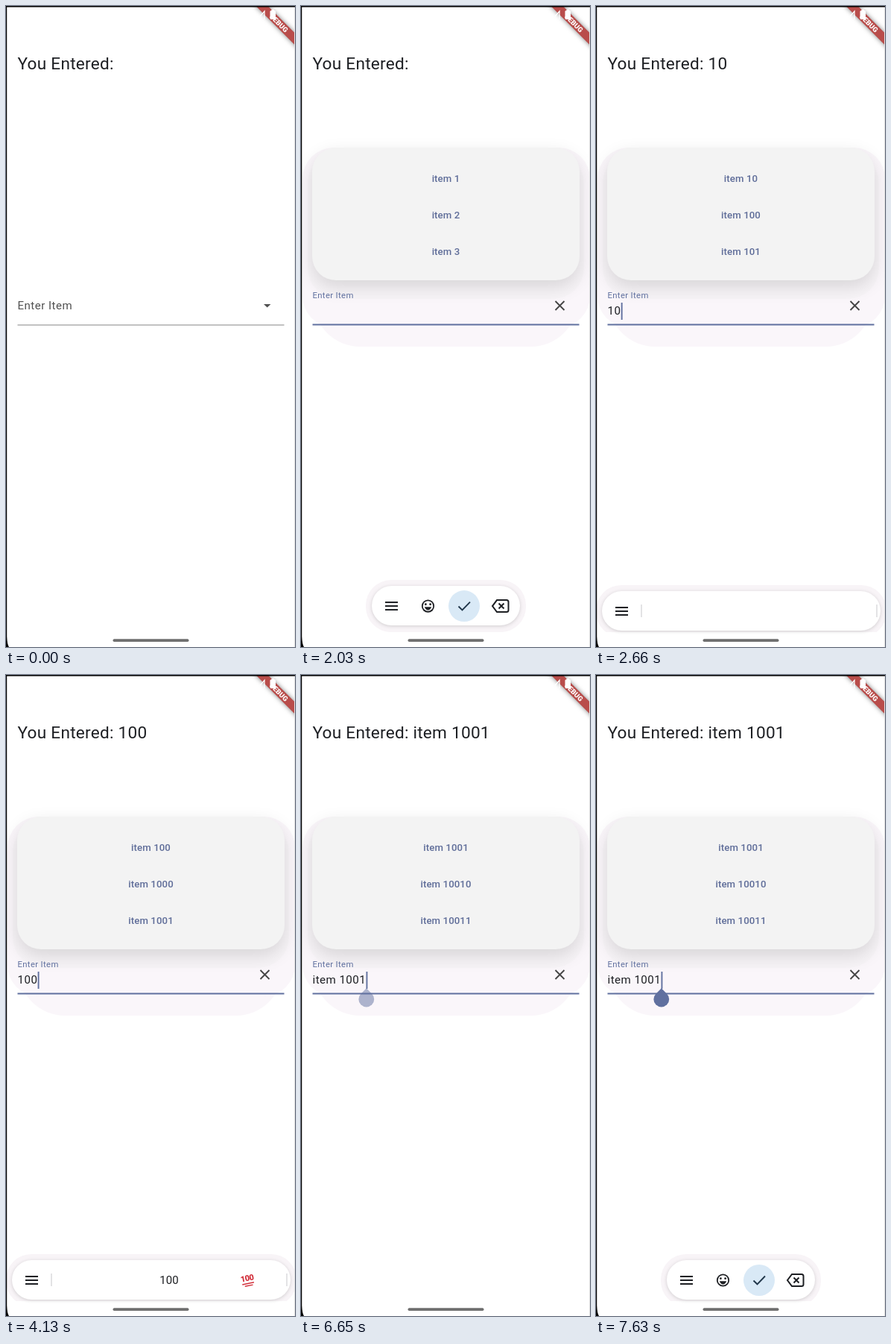
Animation of 388x860 px, one loop 8000 ms. Source, as an HTML page with a canvas:

```html
<!DOCTYPE html>
<html lang="en">
<head>
<meta charset="utf-8">
<style>
  html, body { margin: 0; width: 100%; height: 100%; overflow: hidden; background: #fff; }
  canvas { display: block; width: 388px; height: 860px; }
</style>
</head>
<body>
<canvas width="388" height="860"></canvas>
<script>
const ctx = document.querySelector('canvas').getContext('2d');
const LOOP = 8000, STEP = 70, LEFT = 15.5;
const BLUE = '#60709f', INK = '#1d1f23', GREY = '#505050';

// Search text over time; the matching items follow from it
const typing = [
  [0, '', ['1', '2', '3']],
  [2310, '1', ['1', '10', '11']],
  [2520, '10', ['10', '100', '101']],
  [3010, '100', ['100', '1000', '1001']],
  [5040, 'item 1001', ['1001', '10010', '10011']]
];
const caretOff = [[1960, 2310], [3570, 4130], [4690, 5040], [7070, 7630]];

const clamp = v => Math.min(1, Math.max(0, v));
const mix = (a, b, p) => a + (b - a) * p;

function rect(x, y, w, h, color) {
  ctx.fillStyle = color;
  ctx.fillRect(x, y, w, h);
}

function round(x, y, w, h, r, color) {
  ctx.fillStyle = color;
  ctx.beginPath();
  ctx.roundRect(x, y, w, h, r);
  ctx.fill();
}

function circle(x, y, r, color) {
  ctx.fillStyle = color;
  ctx.beginPath();
  ctx.arc(x, y, r, 0, 7);
  ctx.fill();
}

function stroke(path, color = INK, width = 2) {
  ctx.strokeStyle = color;
  ctx.lineWidth = width;
  ctx.stroke(new Path2D(path));
}

function text(str, x, y, size, color, spacing = 0, weight = 400, align = 'left') {
  ctx.font = `${weight} ${size}px Roboto, sans-serif`;
  ctx.letterSpacing = spacing + 'px';
  ctx.textAlign = align;
  ctx.fillStyle = color;
  ctx.fillText(str, x, y);
}

function at(x, y, angle, draw) {
  ctx.save();
  ctx.translate(x, y);
  ctx.rotate(angle);
  draw();
  ctx.restore();
}

function shadowed(color, blur, dy, draw) {
  ctx.save();
  ctx.shadowColor = color;
  ctx.shadowBlur = blur;
  ctx.shadowOffsetY = dy;
  draw();
  ctx.restore();
}

function drawBanner() {
  at(366.5, 23, Math.PI / 4, () => {
    shadowed('rgba(0,0,0,.5)', 6, 0, () => rect(-50, -5.7, 100, 11.4, '#b94d4b'));
    text('DEBUG', 0, 3.4, 9.4, '#fff', 0, 900, 'center');
  });
  round(354.5, 6, 7.5, 12, 1.5, '#fff');
  rect(356.5, 4.5, 3.5, 2, '#fff');
  stroke('M341 14L347 7V18', '#fff', 1.3);
}

function drawPanel(items) {
  round(17, 250, 354, 207, 62, '#faf6fa');
  round(2, 190, 386, 241, 42, '#faf6fa');
  round(9, 196, 371, 197, 42, '#f7f4f7');
  shadowed('rgba(0,0,0,.13)', 24, 9, () => round(15, 190, 359, 178, 32, '#f3f3f3'));
  items.forEach((n, i) =>
    text('item ' + n, 194.5, 235.5 + 49 * i, 13.2, '#5f6d99', 0.1, 500, 'center'));
}

function drawField(t, value, open) {
  const focused = open && (t >= 1540);
  if (value || focused) text('Enter Item', LEFT, 392, 11.3, focused ? BLUE : '#666', 0.35);
  else text('Enter Item', LEFT, 406.5, 15.08, GREY, 0.47);
  text(value, LEFT, 414, 15.08, INK, 0.47);
  const caretX = LEFT + ctx.measureText(value).width + 0.3;

  if (focused) rect(LEFT, 426.5, 358, 2, BLUE);
  else rect(LEFT, 427.5, 358, 1, '#858585');

  if (!open) {
    ctx.fillStyle = GREY;
    ctx.fill(new Path2D('M346 400H355.4L350.7 404.6Z'));
    return;
  }
  stroke('M341.5 396L353.5 408M353.5 396L341.5 408', '#444', 1.9);
  if (!caretOff.some(([a, b]) => t >= a && t < b)) rect(caretX, 398, 1.9, 23, BLUE);
  if (t >= 6650) {
    ctx.globalAlpha = t < 6720 ? 0.5 : 1;
    at(87.8, 435, Math.PI / 4, () => round(-10.4, -10.4, 20.8, 20.8, [0, 10.4, 10.4, 10.4], BLUE));
    ctx.globalAlpha = 1;
  }
}

function drawIcons() {
  circle(170.5, 812, 8.6, INK);
  circle(170.5, 812, 6.8, '#fff');
  circle(167.4, 809.7, 1.4, INK);
  circle(173.6, 809.7, 1.4, INK);
  ctx.fillStyle = INK;
  ctx.fill(new Path2D('M165.8 813.2H175.2Q173.5 817.4 170.5 817.4T165.8 813.2Z'));
  circle(219, 812, 21, '#d9e9f6');
  stroke('M211.5 812.5L216.5 817.3L227 806.5', '#20364a', 1.9);
  stroke('M263 804H276Q278.5 804 278.5 806.5V817.5Q278.5 820 276 820H263L257 812Z');
  stroke('M265.5 808.5L272.5 815.5M272.5 808.5L265.5 815.5');
}

function drawSuggestions() {
  text('100', 219, 817, 15, INK, 0, 400, 'center');
  at(324, 811, -0.2, () => {
    text('100', 0, 2, 11, '#d2303c', -0.5, 900, 'center');
    stroke('M-8 5.5H8M-5 8.5H6', '#d2303c', 1.5);
  });
}

function drawToolbar(t) {
  const since = t - (t < 5040 ? 1890 : 6930);
  if (since < 0 || (t >= 5040 && t < 6930)) return;
  const dy = 55 * Math.exp(-0.0111 * since) * Math.cos(0.0158 * since);
  const p = t < 5040 ? clamp((t - 2310) / 280) : 0;
  const wide = p * p * (3 - 2 * p);
  const x = mix(95, 8, wide), w = mix(199, 374, wide), menuX = mix(121.5, 34.5, wide);

  ctx.save();
  ctx.beginPath();
  ctx.rect(0, 0, 388, 840);
  ctx.clip();
  round(x - 8, 777 + dy, w + 16, 70, 34, '#f8f4f7');
  ctx.restore();

  ctx.save();
  ctx.translate(0, dy);
  shadowed('rgba(0,0,0,.16)', 5, 1, () => round(x, 785, w, 53, 26.5, '#fff'));
  for (const y of [807, 812, 817]) rect(menuX - 8.5, y - 1, 17, 2, INK);
  ctx.globalAlpha = clamp(1 - p * 3);
  drawIcons();
  ctx.globalAlpha = clamp(p * 4 - 3);
  rect(60.5, 803, 1, 17, '#c8c8cc');
  rect(376.5, 803, 1, 17, '#c8c8cc');
  ctx.globalAlpha = 1;
  if (t >= 3080 && t < 5040) drawSuggestions();
  ctx.restore();
}

function draw(t) {
  const [, value, items] = typing.findLast(entry => t >= entry[0]);
  const open = (t >= 1400 && t < 5040) || t >= 6650;
  rect(0, 0, 388, 860, '#fff');
  drawBanner();
  text('You Entered: ' + value, LEFT, 84.5, 22.63, INK, 0.236);
  if (open) drawPanel(items);
  drawField(t, value, open);
  drawToolbar(t);
  round(143.5, 849.3, 102, 3.7, 1.8, '#6f6f6f');
  rect(387, 2, 1, 858, '#e2e2e2');
  rect(0, 0, 388, 1.5, '#000');
  rect(0, 0, 1.2, 860, '#000');
  ctx.fillStyle = '#000';
  ctx.fill(new Path2D('M0 846H1Q1.5 856 4 860H0Z'));
}

function frame() {
  const t = performance.now() % LOOP;
  draw(Math.floor(t / STEP) * STEP);
  requestAnimationFrame(frame);
}
frame();
</script>
</body>
</html>
```
